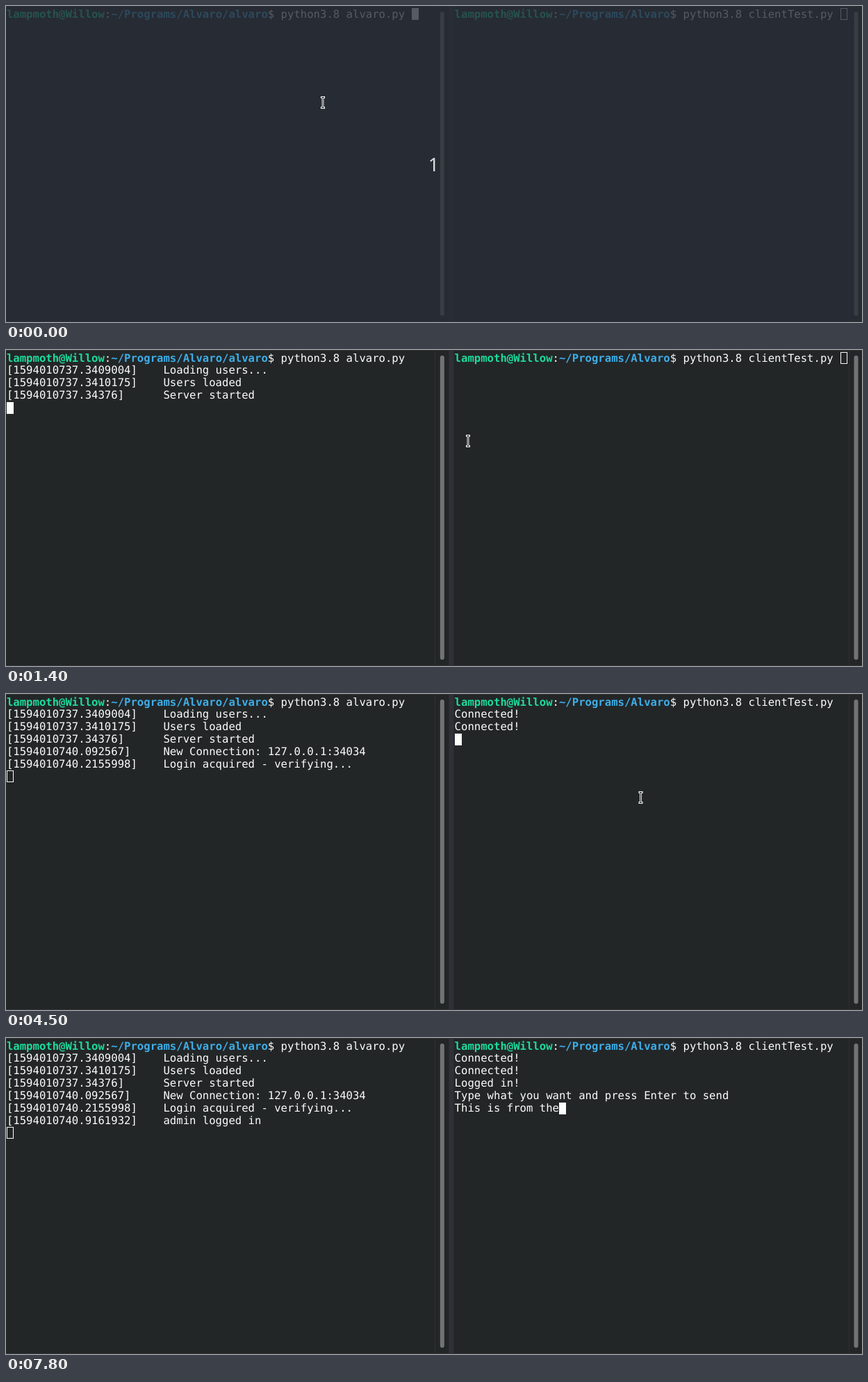
These frames come from a looping animation (1232x455 px, 8 s). An HTML page:

```html
<!DOCTYPE html>
<html lang="en">
<head>
<meta charset="utf-8">
<title>Server and client terminals</title>
<style>
  html, body { margin: 0; width: 1232px; height: 455px; overflow: hidden; background: #232627; }
  svg { display: block; }
  text {
    font: 15.625px "DejaVu Sans Mono", monospace;
    white-space: pre;
    text-rendering: geometricPrecision;
    fill: #fcfcfc;
  }
  .host { font-weight: bold; fill: #1cdc9a; }
  .path { font-weight: bold; fill: #3daee9; }
  .cursor { stroke: #fcfcfc; stroke-width: 1; }
  .count { font: 27px "Noto Sans", sans-serif; text-anchor: middle; }
</style>
</head>
<body>
<svg width="1232" height="455" viewBox="0 0 1232 455">
  <rect width="1232" height="455" fill="#232627"/>
  <path d="M0 .3H1232M0 454.5H1232" stroke="#30333a"/>
  <path d="M617.5 0V454M1213.5 0V454" stroke="#2d3032"/>
  <rect x="637.5" width="7" height="455" fill="#2f3039"/>
  <g fill="#727474">
    <rect x="624.8" y="8" width="6" height="438" rx="3"/>
    <rect x="1220.5" y="8" width="6" height="438" rx="3"/>
  </g>
  <g id="panes"></g>
  <g id="veil">
    <rect width="1232" height="455" fill="#282d36" opacity=".78"/>
    <text class="count" x="615.5" y="238" opacity=".85">1</text>
  </g>
  <g id="mouse" fill="none">
    <path d="M-3 -7.5H3M0 -7.5V7.5M-3 7.5H3" stroke="#fff" stroke-width="2.8"/>
    <path d="M-2 -7.5H2M0 -7.5V7.5M-2 7.5H2" stroke="#202324"/>
  </g>
</svg>
<script>
const LOOP = 8000, STEP = 100, COL = 9.407, ROW = 17.92, TOP = 2.9, BASE = 13.6;
const HOST = "lampmoth@Willow";
const MESSAGE = "This is from the";
const NS = "http://www.w3.org/2000/svg";
const $ = id => document.getElementById(id);

const progress = (t, from, to) => Math.min(1, Math.max(0, (t - from) / (to - from)));
const show = (el, on) => el.setAttribute("visibility", on ? "visible" : "hidden");
const log = (stamp, message) => `[${stamp}]`.padEnd(24) + message;

function add(parent, tag, attrs, content = "") {
  const el = document.createElementNS(NS, tag);
  for (const key in attrs) el.setAttribute(key, attrs[key]);
  el.textContent = content;
  return parent.appendChild(el);
}

// Lines in one batch appear together; returns the pane's draw function.
function makePane(x, path, command, enter, batches) {
  const g = $("panes");
  let count = 0;
  const addLine = content =>
    add(g, "text", { x, y: TOP + count++ * ROW + BASE }, content);

  const prompt = addLine("");
  add(prompt, "tspan", { class: "host" }, HOST);
  add(prompt, "tspan", {}, ":");
  add(prompt, "tspan", { class: "path" }, path);
  add(prompt, "tspan", {}, "$ " + command);
  const endCol = prompt.textContent.length;

  const lines = batches.flatMap(([time, ...texts]) =>
    texts.map(text => ({ time, el: addLine(text) })));
  const typed = addLine("");
  const cursor = add(g, "rect", { class: "cursor", width: 9, height: 16 });

  return (t, focused, input = "") => {
    for (const { time, el } of lines) show(el, t >= time);
    const entered = t >= enter;
    const row = entered ? 1 + lines.filter(line => t >= line.time).length : 0;
    const col = entered ? input.length : endCol;
    typed.textContent = input;
    cursor.setAttribute("x", Math.round(x + col * COL) + .5);
    cursor.setAttribute("y", Math.round(TOP + row * ROW) + .5);
    cursor.setAttribute("fill", focused ? "#fcfcfc" : "none");
  };
}

const server = makePane(.9, "~/Programs/Alvaro/alvaro", "python3.8 alvaro.py ", 900, [
  [1300,
    log("1594010737.3409004", "Loading users..."),
    log("1594010737.3410175", "Users loaded"),
    log("1594010737.34376", "Server started")],
  [3700, log("1594010740.092567", "New Connection: 127.0.0.1:34034")],
  [3900, log("1594010740.2155998", "Login acquired - verifying...")],
  [4700, log("1594010740.9161932", "admin logged in")]
]);
const client = makePane(645.6, "~/Programs/Alvaro", "python3.8 clientTest.py ", 3300, [
  [3900, "Connected!"],
  [4000, "Connected!"],
  [4700, "Logged in!", "Type what you want and press Enter to send"]
]);

// The pointer glides between rests and hides while keys are pressed.
const glides = [
  { start: 0, end: 1, from: [456, 139], to: [456, 139], hide: 800 },
  { start: 1400, end: 1600, from: [665, 131], to: [916, 119], hide: 3300 },
  { start: 3900, end: 4100, from: [916, 122], to: [914, 139] },
  { start: 4200, end: 4500, from: [914, 139], to: [913.5, 149] },
  { start: 5200, end: 5800, from: [913.5, 149], to: [905, 179], hide: 6400 }
];

function drawPointer(t) {
  const glide = glides.findLast(g => t >= g.start);
  const { start, end, from, to, hide = LOOP } = glide;
  const k = Math.sin(progress(t, start, end) * Math.PI / 2);
  const pos = from.map((v, i) => v + (to[i] - v) * k);
  show($("mouse"), t < hide);
  $("mouse").setAttribute("transform", `translate(${pos})`);
}

function draw(time) {
  const t = Math.floor(time / STEP) * STEP;
  const typedCount = t < 6600 ? 0 : 2 + progress(t, 6600, 7800) * (MESSAGE.length - 2);
  const clientFocus = t >= 2300;
  server(t, !clientFocus);
  client(t, clientFocus, MESSAGE.slice(0, typedCount));
  $("veil").setAttribute("opacity", 1 - progress(t, 100, 400));
  drawPointer(t);
}

const start = performance.now();
function tick() {
  draw((performance.now() - start) % LOOP);
  requestAnimationFrame(tick);
}
tick();
</script>
</body>
</html>
```
